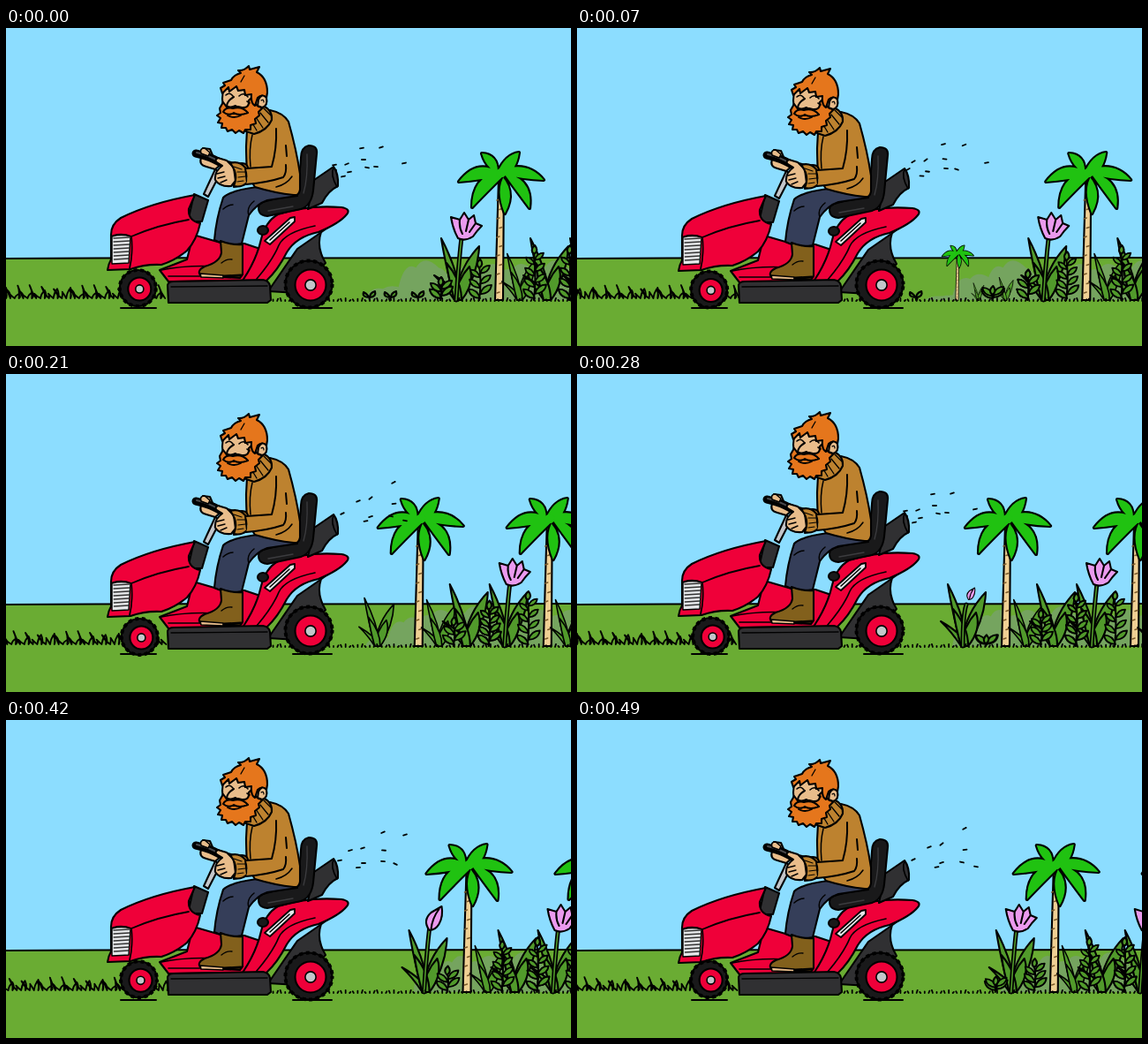
An HTML page that plays this animation: 640x360 px, repeating every 560 ms.

```html
<!DOCTYPE html>
<html lang="en">
<head>
<meta charset="utf-8">
<title>Mower</title>
<style>
html, body { margin: 0; width: 100%; height: 100%; overflow: hidden; background: #8cddff; }
svg { display: block; width: 100%; height: 100%; }
</style>
</head>
<body>
<svg id="stage" viewBox="0 0 640 360" stroke="#000" stroke-width="2.1" stroke-linejoin="round" stroke-linecap="round"></svg>
<script>
const STEP = 70, STEPS = 8, TILE = 146, SPEED = TILE / STEPS, GROUND = 308;
const RED = '#ef0039', DARK = '#303032', BLACK = '#19191a', KNIT = '#bd822f',
      SKIN = '#e9bd8b', HAIR = '#e5761c', NAVY = '#353e59', BOOT = '#82601c',
      LEAF = '#519a2b', PALM = '#20c211', PINK = '#ea9aee', GREY = '#c3c6ca';
const stage = document.getElementById('stage');

const shape = (d, fill = 'none', extra = '') => `<path d="${d}" fill="${fill}" ${extra}/>`;
const line = (d, w = 2, color = '#000') => shape(d, 'none', `stroke="${color}" stroke-width="${w}"`);
const disc = (x, y, rx, ry, fill, extra = '') =>
  `<ellipse cx="${x}" cy="${y}" rx="${rx}" ry="${ry}" fill="${fill}" ${extra}/>`;
const group = (inner, transform) => `<g transform="${transform}">${inner}</g>`;
const clamp = (v, lo = 0, hi = 1) => Math.min(hi, Math.max(lo, v));

// ---------- plants ----------
const fronds = [
  [-48, 11, -28, -15, -22, 9], [-22, -21, -4, -20, -16, 0],
  [20, -22, 5, -20, 17, -1], [48, 9, 28, -15, 24, 8],
  [32, 41, 37, 4, 14, 17], [4, 47, 19, 20, -7, 20], [-33, 40, -33, 6, -8, 14]
];
const crownPath = fronds.map(([x, y, a, b, c, d]) =>
  `M-4 0Q${a} ${b} ${x} ${y}Q${c} ${d} 4 3Z`).join('');

function palm() {
  let ticks = '';
  for (let i = 0; i < 12; i++) {
    const y = -8 - i * 10.5, side = i % 2 ? 1 : -2;
    ticks += `M${side} ${y}l3 -1`;
  }
  return shape('M-4 0L0 -138H6L5 0Z', '#f0d094') + line(ticks, 1.4, '#7b5a2b') +
    group(shape(crownPath, PALM, 'stroke-width="4.2"') + shape(crownPath, PALM, 'stroke="none"') +
      disc(0, 1, 6, 5, PALM, 'stroke="none"'), 'translate(3 -145)');
}

const blade = (x, h, bend = 0) =>
  shape(`M-4 0Q${x * .3 + bend - 7} ${-h * .6} ${x} ${-h}Q${x * .5 + bend + 11} ${-h * .5} 4 0Z`, LEAF);
const blades = () => blade(-27, 28) + blade(-19, 70, -2) + blade(24, 61) + blade(13, 38, 2) + blade(-13, 42);

function fern(h) {
  let out = line(`M0 0Q3 ${-h / 2} 0 ${-h + 6}`, 2);
  const rows = Math.max(2, Math.round(h / 14)), gap = (h - 9) / rows;
  for (let i = 0; i < rows; i++) {
    const y = -2 - i * gap, r = 13 - i;
    for (const s of [-1, 1]) {
      const base = y - (s > 0 ? gap * .4 : 0);
      out += shape(`M1 ${base}q${s * r * .25} ${-r * .8} ${s * r} ${-r * .8}q${-s * r * .1} ${r * .75} ${-s * r} ${r * .8}Z`, LEAF, 'stroke-width="1.8"');
    }
  }
  return out + shape(`M0 ${-h + 8}q-5 -5 1 -10q5 6 -1 10Z`, LEAF);
}

const sprout = () => shape('M0 0Q-1 -6 -7 -9Q-9 -3 0 -3Q0 -8 6 -10Q8 -4 0 -3', LEAF);

function flower(age) {
  if (age < 4) return '';
  const y = age < 5 ? -59 : -83, x = age < 5 ? 4 : 6;
  const stalk = `M-5 0Q${x - 9} -35 ${x - 5} ${y + 12}`;
  const size = age < 5 ? .5 : 1;
  const head = age < 7
    ? shape('M-5 13Q-13 2 -3 -7L9 -14Q11 -3 6 6Q2 13 -5 13ZM-3 12Q-2 0 6 -11', PINK)
    : shape('M-17 -11L-7 -8L-2 -16L3 -8L9 -13L11 -4L18 -1Q12 5 8 11Q-1 17 -9 13Q-15 2 -17 -11ZM-7 -8Q-8 1 -4 8M3 -8L0 5M11 -4L4 6', PINK);
  return line(stalk, 5) + line(stalk, 1.6, LEAF) + group(head, `translate(${x} ${y}) scale(${size})`);
}

const growth = age => age < 0 ? 0 : clamp(.08 + age * .29 + (age >= 3 ? .1 : 0));
const place = (inner, x, s = 1) => s > 0 ? group(inner, `translate(${x} ${GROUND}) scale(${s})`) : '';
const sprouting = (make, x, age, size = 1) =>
  age < 0 ? '' : age < 1 ? place(sprout(), x) : place(make(), x, size * growth(age));

function garden(k) {
  let wash = '', back = '', front = '';
  for (let n = 0; n < 3; n++) {
    const age = k + n * STEPS, px = 412 + age * SPEED;
    if (px > 860) continue;
    const at = dx => px + dx;
    for (const [dx, w, h] of [[-38, 22, 40], [24, 30, 42], [62, 32, 46], [-8, 28, 42]]) {
      const x = at(dx), s = clamp((x - 415) / 55);
      if (s > 0) wash += shape(`M${x - w} ${GROUND}Q${x - w * .8} ${GROUND - h * s} ${x - w * .3} ${GROUND - h * s * .8}` +
        `Q${x} ${GROUND - h * s * 1.15} ${x + w * .5} ${GROUND - h * s * .8}Q${x + w} ${GROUND - h * s * .7} ${x + w} ${GROUND}Z`, '#75a45f', 'stroke="none"');
    }
    back += sprouting(palm, at(0), age);
    back += sprouting(blades, at(24), age, .75);
    back += sprouting(blades, at(55), age);
    back += sprouting(blades, at(-46), age - .6);
    back += place(flower(age), at(-43));
    for (const dx of [-66, -22, 40, 80]) {
      const x = at(dx), h = 60 * clamp((x - 440) / 130);
      if (h > 9) front += place(fern(h), x);
    }
  }
  return wash + back + front;
}

// ---------- grass ----------
function tallGrass(k) {
  const period = SPEED * 4, count = 15;
  let d = '';
  for (let t = -1; t < 3; t++)
    for (let i = 0; i < count; i++) {
      const x = t * period + i * period / count + (k % 4) * SPEED;
      if (x < -8 || x > 180) continue;
      const h = 8 + 3 * Math.sin(i * 2.4) + (i % 3 ? 0 : 4), lean = 5 * Math.sin(i * 4.1);
      d += `M${x} 306Q${x + 1} ${306 - h * .6} ${x + lean} ${306 - h}Q${x + lean + 3} ${306 - h * .4} ${x + 5} 306`;
    }
  return shape(d, '#62a02f', 'stroke-width="1.8"');
}

function cutGrass(k) {
  const gap = SPEED / 4;
  let d = '';
  for (let i = 0; i < 76; i++) d += `M${298 + i * gap} 309l${(i + k) % 3 - 1} ${-1 - i % 4 * .7}`;
  return line(d, 1.8);
}

// ---------- exhaust: x, y, velocity ----------
const specks = [
  [372, 155, 9, -3.7], [386, 154, 9, -4.5], [403, 136, 12, -4.4], [425, 135, 13.5, -2.5],
  [405, 149, 11.5, -.7], [382, 168, 8.5, -.5], [389, 163, 8, -.5], [409, 158, 9, 1],
  [419, 157, 11, 3], [451, 153, 13, -.5], [372, 161, 3, -1]
];
function exhaust(k) {
  let d = '';
  for (const [x, y, vx, vy] of specks) {
    const p = k % 4, nx = x + vx * p, ny = y + vy * p;
    const a = Math.atan2(vy, vx) + Math.sin(nx) * .2, c = 2 * Math.cos(a), s = 2 * Math.sin(a);
    if (nx < 465) d += `M${nx - c} ${ny - s}l${2 * c} ${2 * s}`;
  }
  return line(d, 1.8);
}

// ---------- mower and driver ----------
function wheel(x, y, r, hub, turn) {
  const tread = `fill="none" stroke="#000" stroke-width="4" stroke-dasharray="4 3.6" stroke-linecap="butt" stroke-dashoffset="${turn}"`;
  return disc(x - 1, y, r, r, BLACK) + `<circle cx="${x - 1}" cy="${y}" r="${r}" ${tread}/>` +
    disc(x + 1, y + 1, hub, hub, RED) + disc(x + 1, y + 1, hub * .35, hub * .35, GREY, 'stroke-width="1.6"');
}

const grille = [0, 1, 2, 3, 4, 5, 6].map(i => `M${122 + i * .1} ${238 + i * 4}L${140 - i * .2} ${237 + i * 4}`).join('');

const body =
  shape('M384 212L356 232L330 250L297 298L330 300L362 266Q351 248 357 231Z', DARK) +
  shape('M212 234L243 243L270 244L288 250L270 286L184 287L174 274L205 262Z', RED) +
  shape('M213 188L229 195L222 219L206 219Z', DARK) +
  shape('M119 234Q119 222 130 215Q164 198 214 189L207 205Q206 218 220 221Q216 240 205 252Q192 263 176 268Q158 267 141 273L115 274Q116 267 119 262Z', RED) +
  line('M121 235Q132 232 142 236Q172 223 207 217M142 236Q144 255 140 272', 1.8) +
  shape('M120 236Q131 233 141 236L139 266L120 267Z', '#e4e6e8', 'stroke-width="1.4"') + line(grille, 1.6, '#333') +
  line('M176 274Q205 268 240 270M184 281H266', 1.6) +
  shape('M268 286Q284 262 289 239Q294 219 308 211Q340 200 380 203Q391 205 386 211Q378 221 354 231Q329 236 318 254Q308 274 295 286Z', RED) +
  line('M284 284Q302 263 309 246Q316 231 350 224', 1.7) +
  shape('M293 241L322 215L327 214L327 219L299 245Z', '#e4e6e8', 'stroke-width="1.8"') + line('M299 240L321 220', 1.5) +
  disc(291, 229, 6, 5, BLACK);

const seat =
  shape('M349 172L371 157Q377 165 376 179Q365 184 358 198L342 205Z', DARK) +
  line('M371 158Q367 166 375 180', 1.6) +
  shape('M334 147Q334 135 343 133Q353 133 352 142L348 184Q346 201 334 205L296 213Q283 212 287 198L322 189Q333 176 334 147Z', BLACK) +
  line('M341 143Q342 170 337 187M297 207L325 202', 1.3, '#3c3c3f');

const driver =
  shape('M237 160L224 188L229 191L243 164Z', GREY) +
  shape('M329 187L284 180Q254 184 246 192Q238 216 236 240Q250 247 267 244L275 212Q284 199 296 195L330 190Z', NAVY) +
  line('M275 212Q272 203 281 196M246 205Q252 200 257 200', 1.5) +
  shape('M243 241Q255 246 268 245L268 279L265 283L221 281Q215 275 225 270Q243 265 244 254Z', BOOT) +
  shape('M220 278L246 280L246 283L221 282Z', SKIN, 'stroke-width="1.5"') + line('M247 281L266 280', 3) +
  line('M244 266Q250 261 256 262', 1.3) +
  shape('M273 115Q283 97 299 93Q314 96 320 106Q329 138 333 165L333 183Q332 190 326 189Q305 187 282 180L273 166Q272 145 272 134Z', KNIT) +
  shape('M221 147Q218 155 227 157L237 160L246 152L234 144L231 137L223 136Z', SKIN) +
  line('M215 142Q230 145 244 153', 9) + line('M216 141Q230 144 243 152', 2, '#48484b') +
  shape('M221 142Q219 136 225 136L231 141L229 145Z', SKIN, 'stroke-width="1.6"') +
  shape('M251 151L262 154Q272 151 274 158L271 177L258 180Z', KNIT) +
  shape('M245 156Q236 162 237 172Q242 180 255 179L260 173L258 158L250 150L240 147Q235 150 240 153Z', SKIN) +
  line('M239 165L247 163M240 170L248 168M243 175L250 172', 1.4) +
  shape('M254 153Q264 150 271 158L273 175Q267 181 258 179Q264 166 254 153Z', KNIT) +
  shape('M306 114Q307 136 300 158L272 159Q275 170 272 177Q296 175 314 169Q318 164 317 155', KNIT, 'stroke="none"') +
  line('M306 114Q307 136 301 157L272 159M272 177Q296 175 314 169Q318 164 317 155M317 133L318 145') +
  line('M258 157L267 160M262 163L271 163M263 169L271 168M262 174L269 173', 1.1) +
  line('M279 121Q275 137 277 157M306 180Q318 177 324 168', 1.5) +
  shape('M272 117Q270 109 276 103L291 88Q302 93 301 104Q296 116 281 120Z', KNIT) +
  line('M278 106L284 116M283 101L291 113M288 96L297 107M292 91L300 99', 1.3) +
  shape('M247 69Q243 80 247 91Q262 102 279 96L291 86Q296 72 288 60L264 56Z', SKIN) +
  shape('M246 84L242 91L243 96L239 99L243 102L240 107L245 108L244 113L249 113L251 117L256 115L260 119L264 116L269 119L271 115L277 115L277 110L283 108L282 103L287 99L286 95L291 90Q283 91 279 78L275 82Q276 91 267 90Q258 87 251 91Z', HAIR) +
  shape('M245 74L243 68L248 65L246 62L255 59Q258 53 266 51L263 48Q269 49 275 43L276 47L287 44L284 50Q296 56 296 73L295 79Q290 74 285 79L282 88Q277 85 278 75L271 76L270 70L263 71L261 66L253 72L252 67Z', HAIR) +
  shape('M286 81Q290 73 295 79Q297 88 290 90L285 88Z', SKIN) + line('M289 82Q292 80 292 84', 1.2) +
  shape('M258 78Q251 82 250 88Q254 91 260 88', SKIN) +
  line('M249 76Q253 72 257 77M264 77Q269 72 274 78M273 83L276 85', 1.6) +
  shape('M246 95Q249 89 257 91Q267 88 274 96Q264 100 258 96Q252 100 246 95Z', HAIR) +
  line('M251 99Q258 103 266 99', 1.8) +
  line('M270 54L266 61', 1.3);

const deck =
  shape('M183 291Q184 287 190 287L291 285Q298 286 299 292L300 308L296 311L184 311Z', DARK) +
  line('M187 293L296 292', 1.4);

function vehicle(k) {
  const bob = k % 2, sway = k * Math.PI / 4;
  const fx = 151.5 - 1.2 * Math.cos(sway), fy = 295.5 + 2 * Math.sin(sway - .55);
  return line('M130 317H170M325 317H369', 2) + group(body, `translate(0 ${bob})`) + deck +
    group(seat, `translate(0 ${bob * 2})`) + group(driver, `translate(0 ${bob * 2})`) +
    wheel(fx, fy, 20.5, 13, -k * 2.4) + wheel(344, 290, 26.5, 17.5, -k * 2.4);
}

const backdrop =
  '<rect width="640" height="360" fill="#8cddff" stroke="none"/>' +
  '<rect y="260" width="640" height="100" fill="#6aac33" stroke="none"/>' +
  line('M-2 261Q150 260 300 260.5T642 260', 2);

let shown = -1;
function draw(now) {
  const k = Math.floor(now / STEP) % STEPS;
  if (k !== shown) {
    shown = k;
    stage.innerHTML = backdrop + garden(k) + tallGrass(k) + cutGrass(k) + exhaust(k) + vehicle(k);
  }
}

const start = performance.now();
function tick() {
  draw(performance.now() - start);
  requestAnimationFrame(tick);
}
tick();
</script>
</body>
</html>
```
